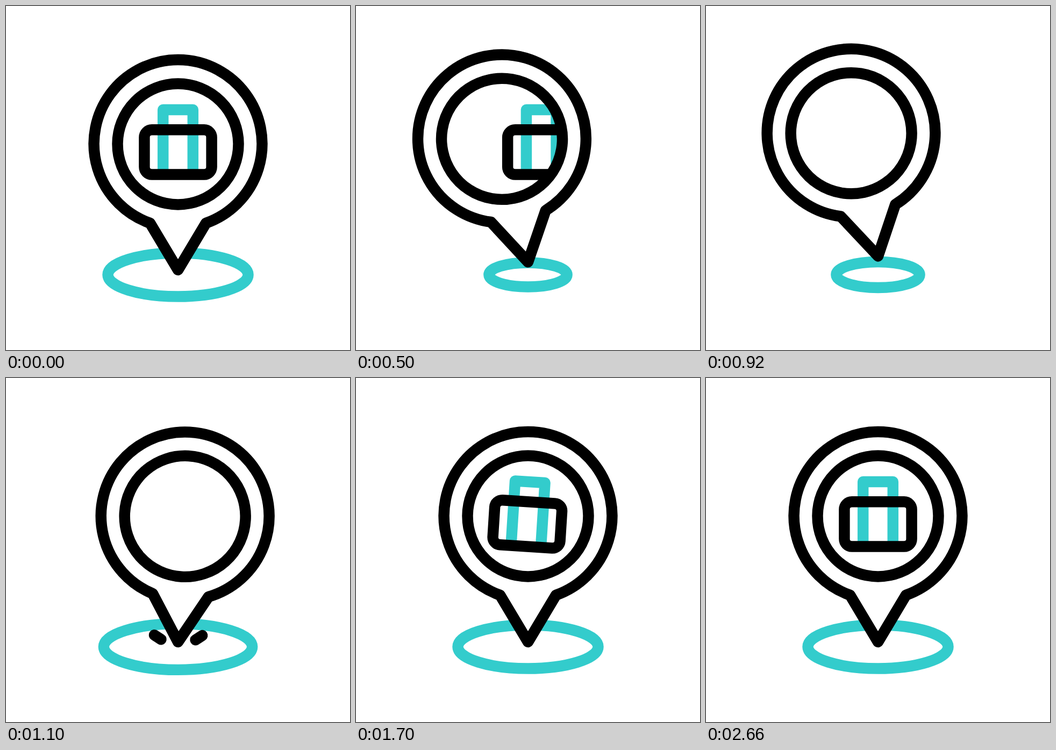
An HTML page for the animation above (3.6 s loop, 640 by 640 pixels).

```html
<!DOCTYPE html>
<html lang="en">
<head>
<meta charset="utf-8">
<title>Travel pin</title>
<style>
  html, body { margin: 0; width: 100%; height: 100%; overflow: hidden; background: #fff; }
  svg { display: block; width: 100%; height: 100%; }
  .line { fill: none; stroke: #000; stroke-width: 20.48; stroke-linecap: round; stroke-linejoin: round; }
  .teal { stroke: #3cc; }
  .flat { stroke-linecap: butt; }
  .solid { fill: #fff; }
</style>
</head>
<body>
<svg viewBox="0 0 640 640">
  <clipPath id="window"><circle id="hole" cx="320" cy="257" r="112.5"/></clipPath>
  <ellipse id="ground" class="line teal" cx="320" cy="500"/>
  <path id="pin" class="line solid" d="M268 404A156.4 156.4 0 1 1 372 404L320 491Z"/>
  <g clip-path="url(#window)">
    <g id="bag">
      <path class="line teal flat" d="M292.2 306V193.1H347.8V306"/>
      <rect class="line" x="257.4" y="230.3" width="125.2" height="83.2" rx="14"/>
    </g>
  </g>
  <circle id="ring" class="line" cx="320" cy="257" r="112.5"/>
  <path id="sparks" class="line"/>
</svg>
<script>
const LOOP = 3600, TURN = 840, LAND = 1040, SWAY = 1073;

const $ = id => document.getElementById(id);
const mix = (a, b, p) => a + (b - a) * p;

// Cubic bezier with flat ends, handles at x = a and x = b
function ease(x, a, b) {
  let lo = 0, hi = 1, s = x;
  for (let i = 0; i < 24; i++) {
    s = (lo + hi) / 2;
    const r = 1 - s;
    if (3 * r * r * s * a + 3 * r * s * s * b + s * s * s < x) lo = s;
    else hi = s;
  }
  return s * s * (3 - 2 * s);
}

// Eased progress from 0 to 1 between two times
function ramp(t, from, to, a = 1 / 3, b = 2 / 3) {
  const x = (t - from) / (to - from);
  return x <= 0 ? 0 : x >= 1 ? 1 : ease(x, a, b);
}

// Lean back, swing over, then sway to rest
function tilt(t) {
  if (t < SWAY) return -18.6 * ramp(t, 0, TURN) + 22.6 * ramp(t, TURN, SWAY);
  const u = Math.min(1, (t - SWAY) / 375);
  return 4 * (1 - u * u) * Math.cos(Math.PI * (t - SWAY) / 140);
}

const lift = t => 40 * (ramp(t, TURN, LAND) - ramp(t, 0, TURN, .89, .49));

const spread = t =>
  1 - .7 * ramp(t, 0, TURN, .5, .566) + .82 * ramp(t, TURN, LAND) - .12 * ramp(t, LAND, 1160);

// The bag slides out to the right, then drops in from above and rocks
function bag(t) {
  if (t < TURN) return { x: 156.5 * ramp(t, 340, TURN) - 13.5 * ramp(t, 0, 340), y: 0, turn: 0 };
  return {
    x: 0,
    y: 200 * ramp(t, 1240, 1620) - 200,
    turn: 5 - 10 * ramp(t, 1610, 2000) + 7 * ramp(t, 2000, 2300) - 2 * ramp(t, 2300, 2660)
  };
}

function spark(x0, y0, x1, y1, from, to) {
  const point = p => mix(x0, x1, p).toFixed(2) + " " + mix(y0, y1, p).toFixed(2);
  return "M" + point(from) + "L" + point(to);
}

function sparks(t) {
  if (t < 1020 || t > 1415) return "";
  const head = ramp(t, 1020, 1170);
  const tail = Math.min(head, ramp(t, 1000, 1400));
  return spark(293.5, 489.5, 262, 469.3, tail, head + .001) +
    spark(347.5, 490.5, 379, 470.2, tail, head + .001);
}

function draw(t) {
  const pose = `translate(0 ${lift(t)}) rotate(${tilt(t)} 320 491)`;
  for (const id of ["pin", "ring", "hole"]) $(id).setAttribute("transform", pose);

  const size = spread(t);
  $("ground").setAttribute("rx", 130.5 * size);
  $("ground").setAttribute("ry", 40.5 * size);

  const { x, y, turn } = bag(t);
  $("bag").setAttribute("transform", `translate(${x} ${y}) rotate(${turn} 320 253.5)`);
  $("sparks").setAttribute("d", sparks(t));
}

const start = performance.now();
function tick() {
  draw((performance.now() - start) % LOOP);
  requestAnimationFrame(tick);
}
tick();
</script>
</body>
</html>
```
